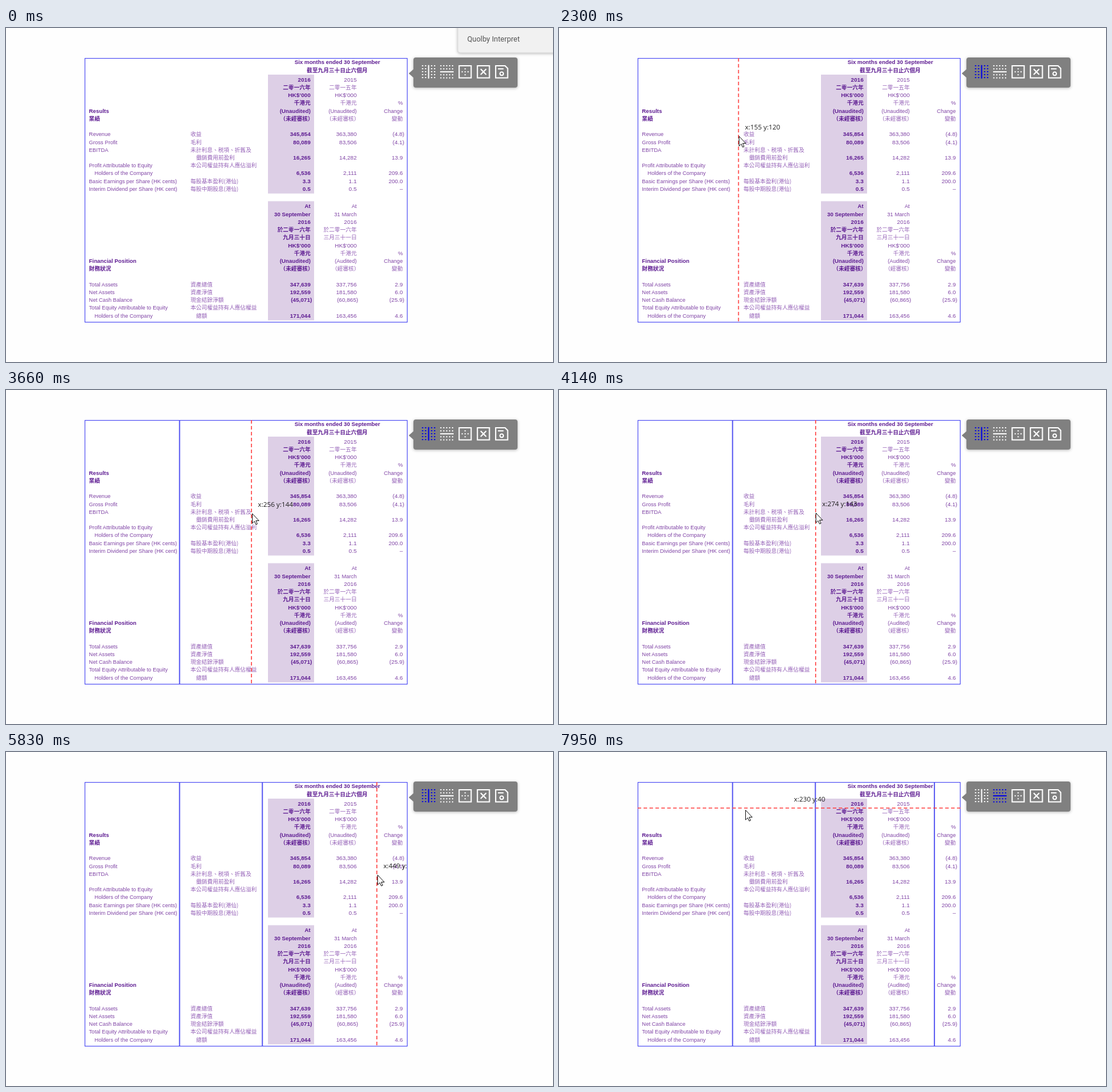
An HTML page that plays this animation: 925 by 566 pixels, repeating every 8000 ms.

```html
<!DOCTYPE html>
<html lang="en">
<head>
<meta charset="utf-8">
<title>Table column picker</title>
<style>
html, body { margin: 0; width: 100%; height: 100%; overflow: hidden; background: #fefefe; }
svg { display: block; }
#sheet text { font-family: "Liberation Sans", Arial, sans-serif; font-size: 9.12px; fill: #8045a6; }
#sheet text.num { font-size: 9.65px; }
#sheet text.cjk { font-family: "Noto Sans CJK TC", "Noto Sans CJK JP", "Noto Sans CJK", sans-serif; font-size: 9.35px; font-weight: 300; fill: #9663b8; }
#sheet text.bold { font-weight: 700; fill: #5e1c92; }
#sheet text.bold:not(.num):not(.cjk) { font-size: 9.4px; }
#label { font: 11.3px "Open Sans", "Noto Sans", sans-serif; fill: #1c1c1c; }
#popup text { font: 12.5px Roboto, sans-serif; fill: #555; }
#border { stroke: #5252f4; stroke-width: 1.2; fill: none; }
#columns { stroke: #4848f0; stroke-width: 1.8; }
#guide { stroke: #ff4040; stroke-width: 1.6; stroke-dasharray: 6 4; mix-blend-mode: multiply; }
.icon { stroke: #fff; stroke-width: 1.6; fill: none; }
.icon.on { stroke: #0000e6; }
.dots { stroke-dasharray: 1.6 2.3; }
</style>
</head>
<body>
<svg id="stage" width="925" height="566" viewBox="0 0 925 566">
  <defs>
    <clipPath id="inside"><rect x="133" y="51" width="546" height="447"/></clipPath>
    <filter id="shadow" x="-20%" y="-40%" width="140%" height="190%">
      <feDropShadow dx="0" dy="1" stdDeviation="2.5" flood-opacity=".3"/>
    </filter>
  </defs>
  <rect width="925" height="566" fill="#fefefe"/>
  <g id="sheet">
    <rect x="133" y="51" width="546" height="447.5" fill="#fff"/>
    <path d="M443 79h78v201.500h-78zM443 293.500h78v202h-78z" fill="#ddcfe6"/>
  </g>
  <rect id="border" x="133.500" y="51.500" width="545" height="447"/>
  <g id="columns"></g>
  <g clip-path="url(#inside)">
    <line id="guide"/>
    <text id="label"></text>
  </g>
  <g id="popup">
    <path d="M764 -6H932V42H768Q764 42 764 38Z" fill="#f1f1f1" stroke="#c4c4c4" stroke-width=".6" filter="url(#shadow)"/>
    <text x="780" y="23">Quolby Interpret</text>
  </g>
  <g id="toolbar">
    <rect x="689" y="50" width="176" height="51" rx="4" fill="#808080" filter="url(#shadow)"/>
    <path d="M681 77L689.500 69.500V84.500Z" fill="#808080"/>
  </g>
  <path id="cursor" d="M.5 .5V17L4.200 13.500L6.600 19L9 18L6.600 12.500H11.800Z" fill="#fff" stroke="#111"/>
</svg>
<script>
const $ = id => document.getElementById(id);
const set = (el, attrs) => { for (const key in attrs) el.setAttribute(key, attrs[key]); };
const show = (el, on) => set(el, { visibility: on ? 'visible' : 'hidden' });

function add(parent, tag, attrs, text = '') {
  const el = document.createElementNS('http://www.w3.org/2000/svg', tag);
  set(el, attrs);
  el.textContent = text;
  return parent.appendChild(el);
}

// ---- Table ----
function cell(text, x, y, bold, anchor = 'start') {
  if (!text) return;
  const cjk = /[\u3000-\u9fff]/.test(text);
  const num = !cjk && (/^[\d.,()–]+$/.test(text) || text.startsWith('HK$'));
  // Closing brackets hang past the right edge.
  if (anchor === 'end') x += text.endsWith('）') ? 4.7 : /\d\)$/.test(text) ? 2.5 : 0;
  const cls = [cjk && 'cjk', num && 'num', bold && 'bold'].filter(Boolean).join(' ');
  add($('sheet'), 'text', { x, y: y + 3.4, class: cls, 'text-anchor': anchor }, text);
}

// Each line: label | Chinese label | current | previous | change.
const results = `||2016|2015
||二零一六年|二零一五年
||HK$’000|HK$’000
||千港元|千港元|%
*Results||(Unaudited)|(Unaudited)|Change
*業績||（未經審核）|（未經審核）|變動

Revenue|收益|345,854|363,380|(4.8)
Gross Profit|毛利|80,089|83,506|(4.1)
EBITDA|未計利息、税項、折舊及
| 攤銷費用前盈利|16,265|14,282|13.9
Profit Attributable to Equity|本公司權益持有人應佔溢利
 Holders of the Company||6,536|2,111|209.6
Basic Earnings per Share (HK cents)|每股基本盈利(港仙)|3.3|1.1|200.0
Interim Dividend per Share (HK cent)|每股中期股息(港仙)|0.5|0.5|–`;

const position = `||At|At
||30 September|31 March
||2016|2016
||於二零一六年|於二零一六年
||九月三十日|三月三十一日
||HK$’000|HK$’000
||千港元|千港元|%
*Financial Position||(Unaudited)|(Audited)|Change
*財務狀況||（未經審核）|（經審核）|變動

Total Assets|資產總值|347,639|337,756|2.9
Net Assets|資產淨值|192,559|181,580|6.0
Net Cash Balance|現金結餘淨額|(45,071)|(60,865)|(25.9)
Total Equity Attributable to Equity|本公司權益持有人應佔權益
 Holders of the Company| 總額|171,044|163,456|4.6`;

function block(text, top) {
  const indent = s => s.startsWith(' ') ? 9.5 : 0;
  text.split('\n').forEach((line, i) => {
    const y = top + 13.23 * i;
    const [name, local = '', now, before, change] = line.split('|');
    cell(name.replace('*', '').trim(), 140.3 + indent(name), y, name.startsWith('*'));
    cell(local.trim(), 312 + indent(local), y);
    cell(now, 515, y, true, 'end');
    cell(before, 593, y, false, 'end');
    cell(change, 671, y, false, 'end');
  });
}

cell('Six months ended 30 September', 560.3, 57.7, true, 'middle');
cell('截至九月三十日止六個月', 560, 72, true, 'middle');
block(results, 87.3);
block(position, 302);

// ---- Toolbar icons on a 24-unit grid: [solid strokes, dotted strokes] ----
const frame = 'M4 4H20V20H4Z';
const icons = [
  ['M12 3V21', 'M4 3.200V21M8 3.200V21M16 3.200V21M20 3.200V21'],
  ['M3 12H21', 'M3.200 4H21M3.200 8H21M3.200 16H21M3.200 20H21'],
  [frame, 'M12 7.300V17M7.300 12H17'],
  [frame + 'M8.300 8.300L15.700 15.700M15.700 8.300L8.300 15.700', ''],
  ['M4 4H16.500L20 7.500V20H4ZM7 8H14.500M12 12.200a2.300 2.300 0 1 0 .01 0Z', '']
].map(([solid, dotted], i) => {
  const icon = add($('toolbar'), 'g', {
    class: 'icon', transform: `translate(${699.4 + 30.9 * i} 59) scale(1.27)`
  });
  add(icon, 'path', { d: solid });
  add(icon, 'path', { d: dotted, class: 'dots' });
  return icon;
});

// ---- Timeline ----
const LOOP = 8000, REFRESH = 105, LAG = 0.3, SCALE = 1.1;
const box = { left: 133, top: 51, right: 679, bottom: 498 };
const easeOut = k => 1 - (1 - k) ** 3;

// Pointer moves: first refresh, last refresh, final x, y.
const moves = [
  [620, 1160, 711, 78], [1340, 1340, 706, 74],
  [1550, 1550, 715, 90], [1760, 2300, 303.5, 183], [2420, 2510, 293, 191], [2960, 2960, 293.5, 191],
  [3410, 3520, 404, 208], [3660, 3660, 415.4, 209.5], [3770, 3890, 440, 209], [4000, 4230, 433.5, 208],
  [5140, 5920, 628, 208], [6040, 6280, 634.8, 208],
  [6770, 6770, 635, 208], [6890, 7410, 737, 78], [7720, 7720, 736, 79], [7950, 8055, 254, 101]
];
const entry = [570, -51];

const rules = [[3200, 293.5], [4780, 433.5], [6770, 634.8]].map(([at, x]) => ({
  at, el: add($('columns'), 'line', { x1: x, x2: x, y1: box.top, y2: box.bottom })
}));

// The pointer advances once per screen refresh; the guide trails it by a part of a refresh.
function pointerAt(time, lag = 0) {
  const i = moves.findLastIndex(move => move[0] <= time);
  if (i < 0) return entry;
  const [first, last, ...to] = moves[i];
  const from = i ? moves[i - 1].slice(2) : entry;
  const count = Math.round((last - first) / REFRESH) + 1;
  const gap = (last - first) / (count - 1) || REFRESH;
  const step = Math.min(count, Math.floor((time - first) / gap + 1e-6) + 1);
  const k = easeOut((step - lag) / count);
  return from.map((start, axis) => start + (to[axis] - start) * k);
}

function drawGuide(time, across) {
  const [px, y] = pointerAt(time, LAG);
  const x = Math.min(px, 669.5);
  set($('guide'), across
    ? { x1: box.left, x2: box.right, y1: y, y2: y }
    : { x1: x, x2: x, y1: box.top, y2: box.bottom });
  set($('label'), { x: x + 11, y: y - 11 });
  const units = length => Math.round(length / SCALE);
  $('label').textContent = `x:${units(x - box.left)} y:${units(y - box.top)}`;
}

function draw(time) {
  const [x, y] = pointerAt(time);
  set($('cursor'), { transform: `translate(${Math.ceil(x)} ${Math.floor(y + 0.1)})` });
  show($('cursor'), time >= 620);
  show($('popup'), time < 1550);

  const across = time >= 7720;
  icons[0].classList.toggle('on', time >= 1550 && !across);
  icons[1].classList.toggle('on', across);
  rules.forEach(({ at, el }) => show(el, time >= at));

  const guiding = (time >= 1760 && !across) || time >= 7950;
  show($('guide'), guiding);
  show($('label'), guiding);
  if (guiding) drawGuide(time, across);
}

const start = performance.now();
function loop() {
  draw((performance.now() - start) % LOOP);
  requestAnimationFrame(loop);
}
loop();
</script>
</body>
</html>
```
